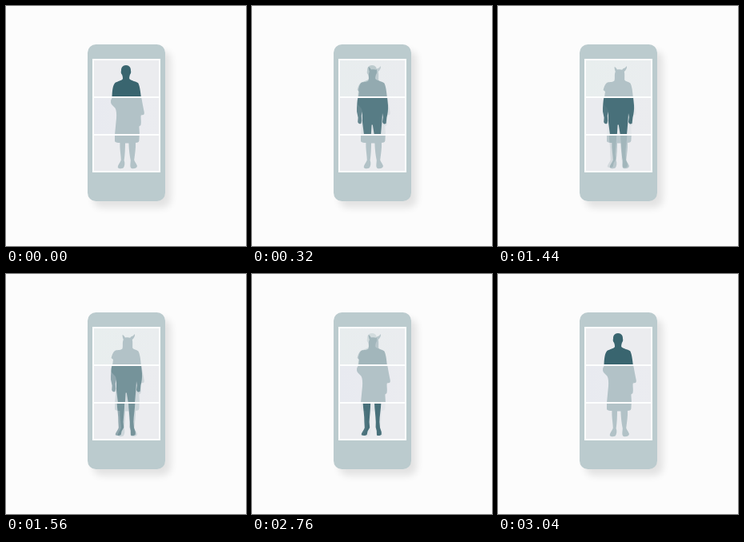
Animation, 300 px wide and 300 px high, one loop 3.08 s. Source, as an HTML page:

```html
<!DOCTYPE html>
<html lang="en">
<head>
<meta charset="utf-8">
<title>Mix and match figure</title>
<style>
  html, body { margin: 0; width: 100%; height: 100%; overflow: hidden; background: #fcfcfc; }
  svg { display: block; width: 100%; height: 100%; }
  .light { fill: #b2c2c7; }
  .dark { fill: #39656f; }
  .panel { fill: #ebecef; }
</style>
</head>
<body>
<svg viewBox="0 0 300 300">
  <defs>
    <filter id="blur" x="-30%" y="-30%" width="160%" height="160%">
      <feGaussianBlur stdDeviation="5"/>
    </filter>
    <linearGradient id="mint">
      <stop offset="0" stop-color="#e8eeee"/>
      <stop offset="1" stop-color="#eaedef"/>
    </linearGradient>
    <linearGradient id="lilac">
      <stop offset="0" stop-color="#e8eaf0"/>
      <stop offset="1" stop-color="#ebecf0"/>
    </linearGradient>
  </defs>

  <rect width="300" height="300" fill="#fcfcfc"/>
  <rect x="109" y="56" width="97" height="196" rx="11" fill="#000" opacity=".1" filter="url(#blur)"/>
  <rect x="102" y="48" width="97" height="196" rx="10.5" fill="#bbcbce"/>

  <!-- head -->
  <rect x="109" y="67" width="83" height="47" fill="url(#mint)"/>
  <path class="light" d="M145.6 76C147 76.6 148.3 78 149 79.6C151 78.9 153.6 79 155.2 79.8
    C156 77.8 157.6 78 158.8 77.2L161 75C161.4 77.6 160 80.4 157.8 82
    C158.6 85.5 158 89 158.2 92.6C159.6 94.6 163 94.6 165.4 96.6C167.4 100 168.2 107 168.8 114
    L133 114L134 107L131.6 105C132.4 101.6 133.6 98 136 96C139 94.6 142 96 145.4 93.6
    C146.6 90 145 86 146.8 82C146 80 145.4 78 145.6 76Z"/>
  <g class="swap">
    <rect class="panel" x="109" y="67" width="83" height="47"/>
    <path class="dark" d="M150 74C154 74 156.3 77 156 81C156.6 82 156 85 155 85.8
      C154.4 88 154 89.4 154.2 91C156 93.4 162 94 165.2 96.2C167.2 99.6 168 107 168.9 114
      H132.5C132.8 107 133.2 99 136.6 95.8C139.6 94 145 93.4 146 91
      C146.1 89 145.6 87.4 145 85.8C143.8 85 143.4 82 144 81C143.7 77 146 74 150 74Z"/>
  </g>

  <!-- torso -->
  <rect x="109" y="114" width="83" height="47" fill="url(#lilac)"/>
  <path class="light" d="M133 114L131.2 117.5C130.8 119.6 131 121.6 132 123L136.4 127.4
    C138 130 138.4 135 138 140L136 161H167L166.4 150.4L168.4 149
    C169.6 145 168 140 168.8 136.6L172 136C173 135 173 133.6 172.6 132L171 124L169.2 114Z"/>
  <g class="swap">
    <rect class="panel" x="109" y="114" width="83" height="47"/>
    <path class="dark" d="M132.4 114C131.6 119 130.8 126 131 132L132.6 139.6L132.2 145
      C133 147 134.6 147.8 136.4 147L137.2 143.4L136.8 137L137.8 132L138 145L140 161H148.8
      L149.6 148.6H150.8L152.8 161H161L162.4 145L163 134L163.8 139L163 145
      C164 147.6 166 148.4 167.6 146.8L168.4 139.6C169.6 135 170.4 129 170 124L169 114Z"/>
  </g>

  <!-- legs -->
  <rect class="panel" x="109" y="161" width="83" height="46"/>
  <path class="light" d="M136 161H166.8L166.4 168.6C166 170.6 164 171 162 171
    C162.4 178 161 186 160.2 192.4C161 195 163.4 197.4 164 200C163.6 202.4 161 203.4 158 203.2
    C155.6 203 155.2 200.6 155.4 198L155.8 193C154.4 186 153.6 178 153.4 171.4H149
    C149 178 148.6 187 147.6 193C149 196 148.4 200 146.6 202.6C144 203.6 141 203.4 139.8 202
    C139.6 198.4 142.6 196 143.8 192.4C143.6 186 142 178 142.4 171C139 171 136.4 170.6 136 169Z"/>
  <g class="swap">
    <rect class="panel" x="109" y="161" width="83" height="46"/>
    <path class="dark" d="M138.6 161H148.2C148 170 147 178 146.6 185L147.2 192L144.6 196.4
      L143.6 201C141.6 202.4 138.4 202.2 136.8 201.2C136.8 198 139.6 196 140.8 192L140.4 185
      C140.6 177 139 169 138.6 161Z
      M153 161H161.4C161 170 159.4 178 159.4 185L160 192L161.8 197.6V200.8
      C160 202.4 157.4 202.4 156 201.4L155.8 196L154.6 191.6L154.8 185C154.6 177 153.2 169 153 161Z"/>
  </g>

  <path d="M109 67H192V207H109ZM109 114H192M109 161H192" fill="none" stroke="#fdfefe" stroke-width="2"/>
</svg>
<script>
  const LOOP = 3080, STEP = 40, STEPS = 8;
  const STARTS = [120, 1440, 2760];
  const [head, torso, legs] = document.querySelectorAll('.swap');

  // Crossfade in equal steps, the first one already visible at its start.
  const fade = (t, start) =>
    Math.max(0, Math.min(1, (Math.floor((t - start) / STEP) + 1) / STEPS));

  function render(t) {
    const [a, b, c] = STARTS.map(start => fade(t, start));
    head.style.opacity = 1 - a + c;
    torso.style.opacity = a - b;
    legs.style.opacity = b - c;
  }

  function tick() {
    render(performance.now() % LOOP);
    requestAnimationFrame(tick);
  }
  tick();
</script>
</body>
</html>
```
